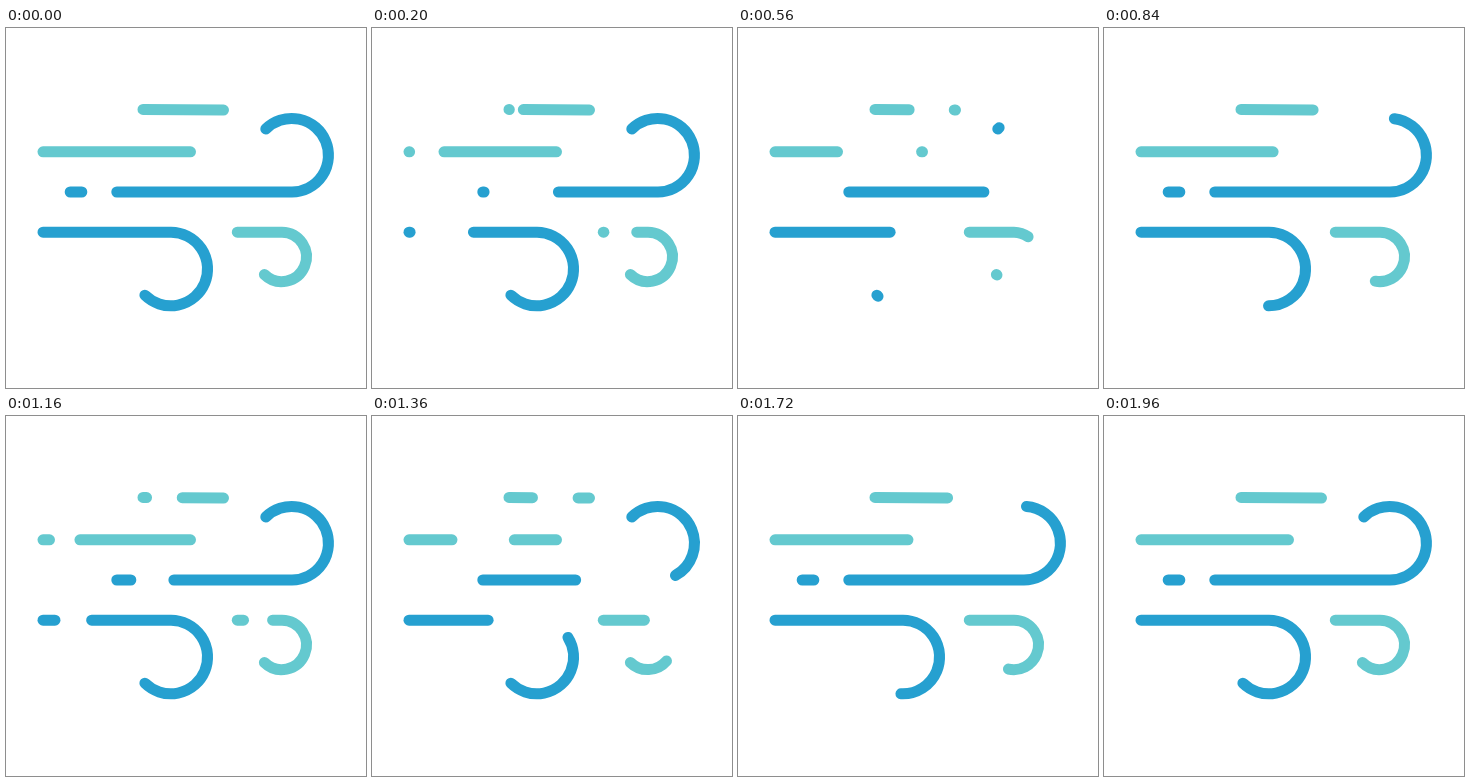
An HTML page that plays this animation: 360x360 px, repeating every 2000 ms.

```html
<!DOCTYPE html>
<html lang="en">
<head>
<meta charset="utf-8">
<title>Wind</title>
<style>
  html, body { margin: 0; width: 100%; height: 100%; overflow: hidden; background: #fff; }
  svg { display: block; width: 100vw; height: 100vh; }
  path { fill: none; stroke-width: 11; stroke-linecap: round; }
</style>
</head>
<body>
<svg id="stage" viewBox="0 0 360 360"></svg>
<script>
const LOOP = 2000, STEP = 40;
const DARK = '#26a0d0', LIGHT = '#64c9cf';
const stage = document.getElementById('stage');

// Cubic easing through (x1, 0) and (x2, 1), solved by bisection.
const easing = (x1, x2) => x => {
  if (x <= 0) return 0;
  if (x >= 1) return 1;
  let low = 0, high = 1;
  for (let i = 0; i < 24; i++) {
    const u = (low + high) / 2, v = 1 - u;
    if (3 * u * v * v * x1 + 3 * u * u * v * x2 + u ** 3 < x) low = u; else high = u;
  }
  return low * low * (3 - 2 * low);
};
const smooth = easing(.42, .58);
const tween = (begin, end, ease = smooth) => t => ease((t - begin) / (end - begin));

const grow1 = tween(160, 1038), grow2 = tween(1029, 1914);

// Each stroke is wiped away and redrawn twice per loop.
function gust(color, d, wipe1, wipe2, draw1 = grow1, draw2 = grow2) {
  const pieces = [0, 1, 2].map(() => {
    const path = document.createElementNS('http://www.w3.org/2000/svg', 'path');
    path.setAttribute('d', d);
    path.setAttribute('stroke', color);
    path.setAttribute('pathLength', 1);
    return stage.appendChild(path);
  });
  return t => {
    const spans = [[wipe1(t), 1], [wipe2(t), draw1(t)], [0, draw2(t)]];
    pieces.forEach((path, i) => {
      const [from, to] = spans[i], length = to - from;
      path.style.display = length > .0005 ? '' : 'none';
      path.setAttribute('stroke-dasharray', `${Math.max(length, 0)} 9`);
      path.setAttribute('stroke-dashoffset', -from);
    });
  };
}

const wipe = tween(0, 593);
const darkWipe = tween(942, 1685), lightWipe = tween(915, 1622);

const gusts = [
  gust(LIGHT, 'M137 81.5L217.5 82', tween(30, 611), tween(880, 1660, easing(.33, .31))),
  gust(LIGHT, 'M37 123.8H184.5', wipe, lightWipe),
  gust(LIGHT, 'M231.3 204.2H276A24.7 24.7 0 1 1 258.4 246.5', wipe, lightWipe),
  gust(DARK, 'M64.2 164H75.8', tween(0, 170), tween(940, 1110), tween(570, 735), tween(1440, 1605)),
  gust(DARK, 'M110.8 164H286A36.8 36.8 0 1 0 259.8 101', wipe, darkWipe),
  gust(DARK, 'M37 204.2H165A36.8 36.8 0 1 1 138.9 267.2', wipe, darkWipe)
];

function draw(now) {
  const t = Math.floor((now % LOOP) / STEP) * STEP;
  gusts.forEach(update => update(t));
}

const start = performance.now();
function tick() {
  draw(performance.now() - start);
  requestAnimationFrame(tick);
}
draw(0);
requestAnimationFrame(tick);
</script>
</body>
</html>
```
